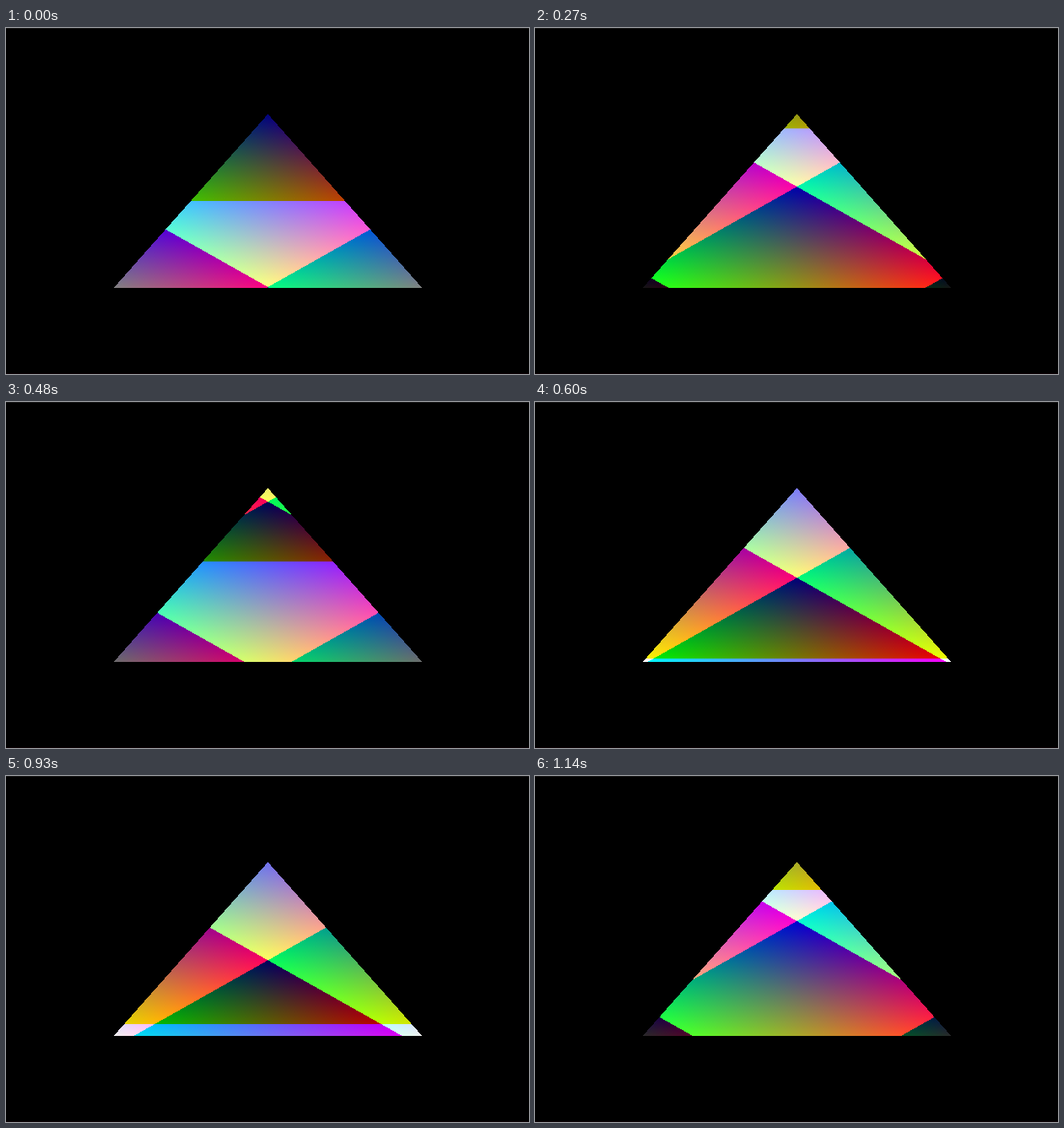
An HTML page with a canvas that plays this animation: 620 px wide and 410 px high, repeating every 1.17 s.

```html
<!DOCTYPE html>
<html lang="en">
<head>
<meta charset="utf-8">
<title>Colour wrap triangle</title>
<style>
  html, body { margin: 0; width: 100%; height: 100%; overflow: hidden; background: #000; }
  canvas { display: block; }
</style>
</head>
<body>
<canvas id="stage" width="620" height="410"></canvas>
<script>
const ctx = document.getElementById('stage').getContext('2d');
const STEP = 30, COUNT = 39;
const tri = { left: 128, right: 493, top: 102, bottom: 307.6 };
const box = { x: 127, y: 101, w: 367, h: 208 };
const image = ctx.createImageData(box.w, box.h);

// The phase swings as a sine, with a small timing drift pinned at a few steps.
const pins = [[0, .503], [5, 1.871], [12, 1.624], [20, -1.017],
              [27, -2.547], [31, -2.066], [38, .16]];
const swing = n => -.19 + 2.34 * Math.sin(2 * Math.PI * n / COUNT + .309);
const drift = pins.map(([n, p]) => [n, p - swing(n)]);
drift.push([COUNT, drift[0][1]]);

function phase(n) {
  const i = drift.findIndex(d => d[0] > n);
  const [n0, d0] = drift[i - 1], [n1, d1] = drift[i];
  return swing(n) + d0 + (d1 - d0) * (n - n0) / (n1 - n0);
}

const wrap = v => Math.round((v - Math.floor(v)) * 255);

function draw(n) {
  const p = phase(n), data = image.data;
  const width = tri.right - tri.left, height = tri.bottom - tri.top;
  for (let y = 0; y < box.h; y++) {
    const v = (tri.bottom - (box.y + y + .5)) / height;
    for (let x = 0; x < box.w; x++) {
      const u = (box.x + x + .5 - tri.left) / width;
      const inside = v >= 0 && v <= 1 && Math.abs(u - .5) <= (1 - v) / 2;
      const i = (y * box.w + x) * 4;
      data[i] = inside ? wrap(p - 1 + u - v) : 0;
      data[i + 1] = inside ? wrap(p - u - v) : 0;
      data[i + 2] = inside ? wrap(p + v) : 0;
      data[i + 3] = 255;
    }
  }
  ctx.putImageData(image, box.x, box.y);
}

function bar(y, color) {
  ctx.fillStyle = color;
  ctx.fillRect(0, y, 620, 1);
}

ctx.fillStyle = '#000';
ctx.fillRect(0, 0, 620, 410);
bar(0, '#161616');
bar(409, '#0c0004');

const start = performance.now();
let last = -1;
function tick() {
  const n = Math.floor((performance.now() - start) / STEP) % COUNT;
  if (n !== last) draw(last = n);
  requestAnimationFrame(tick);
}
tick();
</script>
</body>
</html>
```
